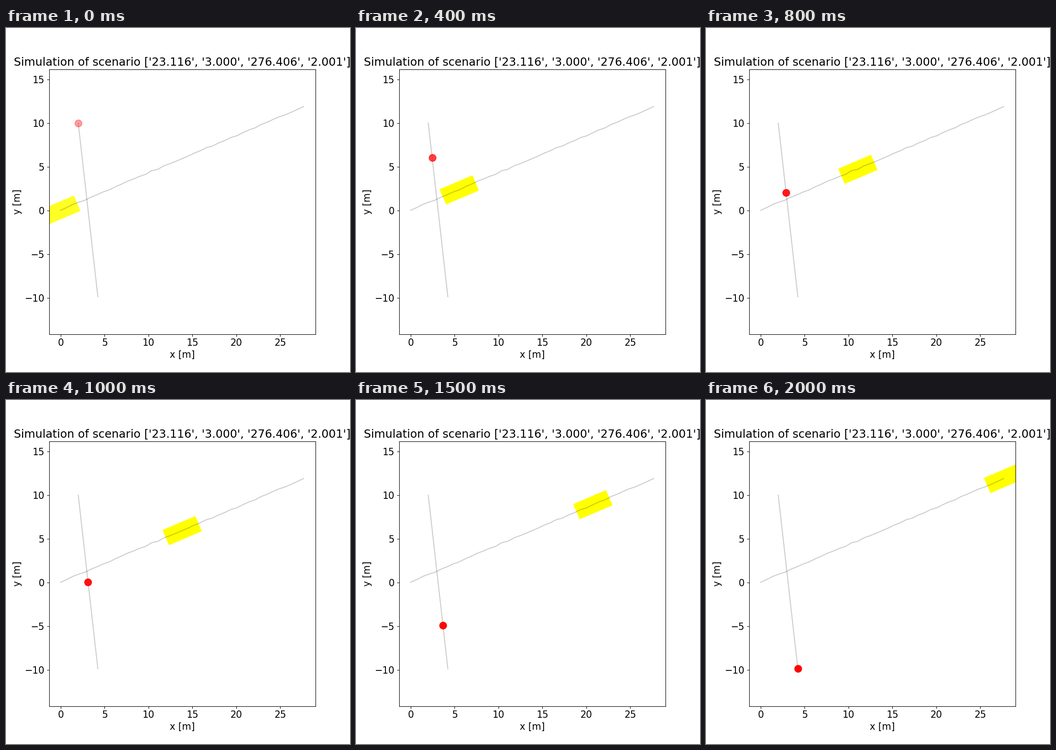
A matplotlib script that plays this animation: 748 px wide and 748 px high, repeating every 2100 ms.

```python
import numpy as np
import matplotlib.pyplot as plt
from matplotlib.animation import FuncAnimation
from matplotlib.patches import Polygon

STEPS = 21
SIZE = 748
DPI = 100
HEADING = np.radians(23.116)
WALK = np.radians(276.406)
LENGTH, WIDTH = 4.0, 1.82

plt.rcParams.update({"font.family": "DejaVu Sans", "font.size": 14.8})

# Car path: a straight drive with slight sensor noise, two samples per step
samples = 2 * STEPS - 1
rng = np.random.default_rng(4)
path_x = np.linspace(0, 27.65, samples)
path_y = np.linspace(0.05, 11.87, samples) + rng.normal(0, 0.035, samples)

# Pedestrian walks one metre per step
dist = np.arange(STEPS)
walk_x = 2 + dist * np.cos(WALK)
walk_y = 10 + dist * np.sin(WALK)


def car_corners(x, y):
    along = np.array([np.cos(HEADING), np.sin(HEADING)]) * LENGTH / 2
    across = np.array([-np.sin(HEADING), np.cos(HEADING)]) * WIDTH / 2
    signs = ((-1, 1), (1, 1), (1, -1), (-1, -1))
    return [np.array([x, y]) + a * along + b * across for a, b in signs]


fig, ax = plt.subplots(figsize=(SIZE / DPI, SIZE / DPI), dpi=DPI)
ax.set_xlim(-1.33, 29.02)
ax.set_ylim(-14.15, 16.16)
ax.set_xlabel("x [m]")
ax.set_ylabel("y [m]")
ax.set_title("Simulation of scenario ['23.116', '3.000', '276.406', '2.001']")

for xs, ys in ((path_x, path_y), (walk_x, walk_y)):
    ax.plot(xs, ys, color="black", alpha=0.2, lw=1.5)

car = ax.add_patch(Polygon(car_corners(0, 0), color="yellow", lw=1))
walker, = ax.plot([], [], "o", color="red", ms=11, mew=1, zorder=3)


def update(i):
    car.set_xy(car_corners(path_x[2 * i], path_y[2 * i]))
    car.set_alpha(1 - 0.14 * 0.4 ** i)
    walker.set_data([walk_x[i]], [walk_y[i]])
    walker.set_alpha(1 - 0.62 * 0.8 ** i)
    return car, walker


anim = FuncAnimation(fig, update, frames=STEPS, interval=100, repeat=True)
plt.show()
```
